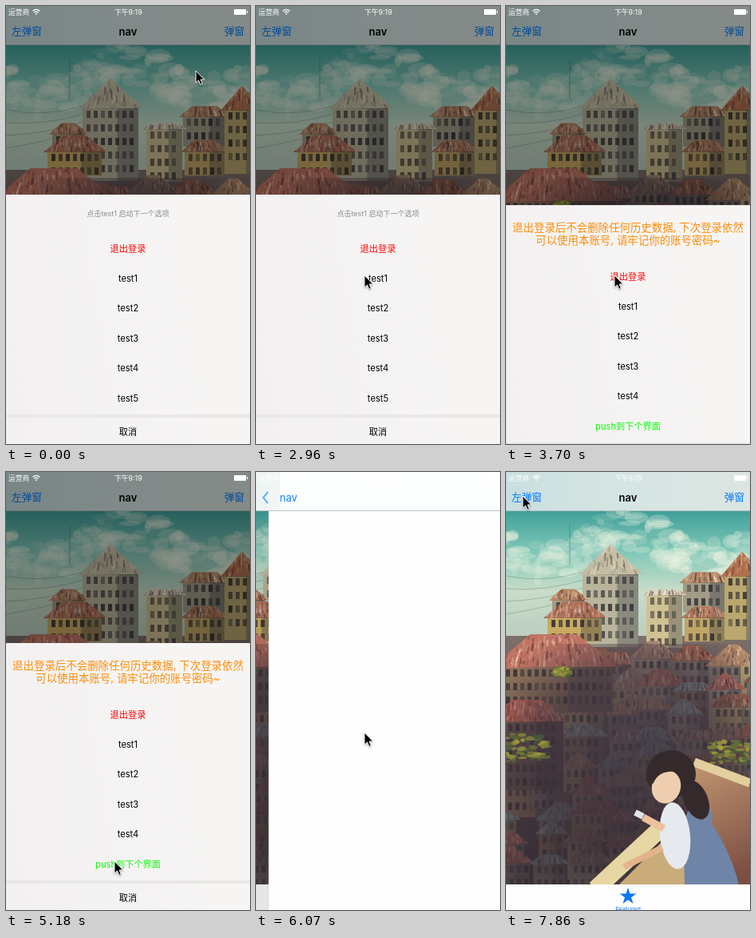
Write an HTML page with a canvas that moves like this. It is 306x548 px and loops after 8 s.

```html
<!DOCTYPE html>
<html lang="zh-CN">
<head>
<meta charset="utf-8">
<title>Action sheet</title>
<style>
html, body { margin: 0; width: 306px; height: 548px; overflow: hidden; background: #fff; }
#stage { position: relative; width: 306px; height: 548px; overflow: hidden;
  font-family: Inter, "Noto Sans CJK SC", "Noto Sans CJK", sans-serif; font-size: 11.2px; color: #000; }
#stage div, #stage svg, canvas { position: absolute; }
.full { left: 0; top: 0; width: 306px; height: 548px; }
.line { left: 0; width: 306px; height: 38px; line-height: 38px; text-align: center; white-space: nowrap; }
canvas { left: 0; top: 48px; }
#tab { left: 0; top: 516px; width: 306px; height: 32px; background: #fdfdfd; }
#shade, #dim { background: #000; }
#page { background: #fefefe; box-shadow: -1px 0 3px rgba(0,0,0,.08); }
#nav { left: 0; top: 0; width: 306px; height: 48px; background: #fdfefe; border-bottom: 1px solid #bcc2c2; overflow: hidden; }
#tint { left: 0; top: 0; height: 48px; background: linear-gradient(90deg, #c9dfdf, #d5e5e3 45%, #dce5e1); }
.btn { top: 13px; line-height: 38px; font-size: 12.7px; color: #007aff; white-space: nowrap; }
.nav { top: 13px; width: 60px; text-align: center; line-height: 38px; font-size: 13px; }
.sheet { left: 0; width: 306px; overflow: hidden; background: linear-gradient(80deg, #f2f0f0, #f6f5f4 70%); }
.gap { left: 0; width: 306px; height: 4px; background: #e9e8e7; }
.red { color: #f00; }
.green { color: #0f0; }
.hint { font-size: 9px; color: #8c8c8c; }
.warn { font-size: 13.45px; color: #ff8c0a; }
.status { top: 1px; line-height: 14px; font-size: 8.8px; color: #fff; white-space: nowrap; }
</style>
</head>
<body>
<div id="stage">
  <div id="home" class="full">
    <canvas id="art" width="306" height="468"></canvas>
    <div id="tab">
      <svg width="306" height="32"><path id="star" fill="#0a78f5"/></svg>
      <div class="line" style="top:13px;font-size:7.6px;color:#0a78f5">Featured</div>
    </div>
    <div id="shade" class="full"></div>
  </div>
  <div id="page" class="full"></div>
  <div id="nav">
    <div id="tint"></div>
    <svg id="chevron" width="20" height="48"><path d="M15 25 9 32l6 7" fill="none" stroke="#007aff" stroke-width="2"/></svg>
    <div class="btn side" style="left:7px">左弹窗</div>
    <div class="btn side" style="right:7px">弹窗</div>
    <div id="back" class="nav" style="color:#007aff">nav</div>
    <div id="title" class="nav" style="font-weight:600">nav</div>
  </div>
  <div id="dim" class="full"></div>
  <div id="sheetA" class="sheet"></div>
  <div id="sheetB" class="sheet"></div>
  <div class="status" style="left:3px">运营商</div>
  <div class="status" style="left:136px">下午9:19</div>
  <svg width="306" height="16" fill="none" stroke="#fff">
    <path d="M33.5 6.2q4.5-3.8 9 0M35.2 8.2q2.8-2.3 5.6 0" stroke-width="1.2"/>
    <circle cx="38" cy="10" r="1" fill="#fff" stroke="none"/>
    <path d="M286.5 4.5h14v6h-14zM302.5 6v3" fill="#fff"/>
  </svg>
  <svg id="cursor" width="16" height="22" style="left:-1px;top:-1px;filter:drop-shadow(0 1px 1px rgba(0,0,0,.35))">
    <path d="M1 1v15.2l3.5-3.2 2.3 5.4 2.6-1.1-2.3-5.3h4.7z" fill="#000" stroke="#fff"/>
  </svg>
</div>
<script>
const $ = id => document.getElementById(id);
let seed = 7;
const rnd = () => (seed = seed * 16807 % 2147483647) / 2147483647;
const pick = list => list[Math.floor(rnd() * list.length)];

// ---- Townscape ----
const g = $('art').getContext('2d');
g.translate(0, -48);

function gradient(x, y, x2, y2, ...colors) {
  const grad = g.createLinearGradient(x, y, x2, y2);
  colors.forEach((c, i) => grad.addColorStop(i / (colors.length - 1), c));
  return grad;
}
function fill(color, path) {
  const shape = new Path2D(path);
  g.fillStyle = color;
  g.fill(shape);
  return shape;
}
function blob(color, x, y, rx, ry, turn = 0) {
  g.fillStyle = color;
  g.beginPath();
  g.ellipse(x, y, rx, ry, turn, 0, 7);
  g.fill();
}
function stroke(color, width, path) {
  g.strokeStyle = color;
  g.lineWidth = width;
  g.stroke(new Path2D(path));
}

// x, y: upper left of the wall; rise: roof height relative to width
function house(x, y, w, h, wall, top, rise = .24) {
  fill(wall, `M${x} ${y}h${w}v${h}h${-w}z`);
  fill('rgba(40,48,62,.32)', `M${x + w * .62} ${y}h${w * .38}v${h}h${-w * .38}z`);
  for (let wy = y + 7; wy < y + h - 9; wy += 17)
    for (let wx = x + 5; wx < x + w - 6; wx += 9) {
      g.fillStyle = `rgba(45,42,48,${.45 + rnd() * .4})`;
      g.fillRect(wx, wy, 5, 9);
    }
  fill('rgba(35,28,35,.4)', `M${x} ${y}h${w}v5h${-w}z`);

  const ridge = w * Math.max(0, .45 - rise), mid = x + w / 2, up = y - w * rise;
  g.save();
  g.clip(fill(top, `M${x - 5} ${y + 5}L${mid - ridge} ${up}L${mid + ridge} ${up}L${x + w + 6} ${y + 4}z`));
  for (let i = 0; i < w * 1.6; i++) {
    const sx = x - 5 + rnd() * (w + 10), sy = up + rnd() * (y - up), len = 3 + rnd() * 9;
    const tone = rnd() < .55 ? '255,235,210' : '50,28,35';
    stroke(`rgba(${tone},${rnd() * .45})`, 1 + rnd() * 1.5, `M${sx} ${sy}l${(sx - mid) / w * len} ${len}`);
  }
  g.restore();
}
function foliage(x, y, spread) {
  for (let i = 0; i < 90; i++) {
    const t = rnd();
    blob(`rgba(${60 + t * 120 | 0},${80 + t * 90 | 0},60,.75)`,
      x + (rnd() - .5) * spread * 2, y + (rnd() - .5) * spread, 2 + rnd() * 4, 1 + rnd() * 2);
  }
}
function drawSky() {
  g.fillStyle = gradient(0, 48, 0, 200, '#3f9f99', '#7fc7b8', '#c9ddc9', '#bccfc0');
  g.fillRect(0, 48, 306, 200);
  for (let i = 0; i < 170; i++) {
    const x = rnd() * 306, band = 88 + 22 * Math.sin(x / 32);
    blob(`rgba(232,240,222,${.08 + rnd() * .3})`, x, band + (rnd() - .4) * 50, 4 + rnd() * 13, 3 + rnd() * 6);
  }
  for (let i = 0; i < 4; i++) stroke('rgba(70,95,95,.45)', .7, `M0 ${130 + i * 16}Q50 ${140 + i * 10} 100 ${124 + i * 10}`);
  stroke('rgba(70,95,95,.6)', .8, 'M80 66v50');
}
function drawTown() {
  const walls = ['#b7a272', '#a59d88', '#857b72', '#96795c'];
  const roofs = ['#bd6d5b', '#a8694e', '#7fa3a2', '#a58672', '#b58a68'];
  g.fillStyle = gradient(0, 190, 0, 516, '#81736c', '#554950', '#443a42');
  g.fillRect(0, 205, 306, 311);

  house(96, 124, 70, 95, '#b9b49b', '#c3bea4', .48);
  house(58, 156, 40, 50, '#a59a80', '#b5805e');
  house(52, 178, 68, 34, '#c9aa62', '#b0715a');
  house(222, 134, 54, 42, '#a29b85', '#b88a66', .16);
  house(224, 178, 50, 34, '#c0a565', '#b0795a', .2);
  house(274, 126, 44, 84, '#b9a76e', '#b0714f', .6);
  house(176, 150, 45, 70, '#cfc193', '#dcd8c2', .08);

  for (let y = 224; y < 490; y += 32)
    for (let x = -20; x < 306; x += 44)
      house(x + rnd() * 20, y + rnd() * 18, 30 + rnd() * 34, 34 + rnd() * 20, pick(walls), pick(roofs), .15 + rnd() * .25);
  house(-14, 240, 148, 60, '#8d735b', '#c17463', .25);
  house(-20, 308, 92, 90, '#6a5651', '#bd6355', .25);

  // The alley and the lower storeys lie in shadow
  const shadow = g.createRadialGradient(165, 360, 30, 165, 360, 190);
  shadow.addColorStop(0, 'rgba(66,56,68,.82)');
  shadow.addColorStop(.55, 'rgba(66,52,62,.65)');
  shadow.addColorStop(1, 'rgba(66,52,62,0)');
  g.fillStyle = shadow;
  g.fillRect(0, 215, 306, 301);
  g.fillStyle = gradient(0, 250, 0, 480, 'rgba(52,42,50,0)', 'rgba(52,42,50,.7)');
  g.fillRect(0, 250, 306, 266);
  foliage(18, 345, 34);
  foliage(285, 350, 28);
  foliage(70, 250, 9);
}
function drawBalcony() {
  fill(gradient(240, 370, 306, 500, '#bd926f', '#7c4e42'), 'M236 362L306 392V516H225z');
  stroke('#e3cf9d', 11, 'M236 363L306 389');
  fill('#c9ac79', 'M142 516L206 452L228 480V516z');
  stroke('#e8d6a4', 22, 'M112 522L194 446');

  // Girl, as plain shapes
  fill('#6f85a8', 'M222 440Q236 402 242 400Q262 420 258 440Q282 476 292 516H224z');
  blob('#e6e9ee', 212, 455, 19, 42, -.1);
  stroke('#ecc19c', 9, 'M198 446L172 432');
  stroke('#e2b48c', 8, 'M196 470L148 494');
  stroke('#dfe6ea', 8, 'M162 426L172 431');
  blob('#352a2b', 238, 410, 15, 26, -.4);
  blob('#352a2b', 207, 378, 31, 30);
  blob('#efceb0', 201, 394, 18, 21, .3);
  stroke('#352a2b', 10, 'M180 388Q188 368 212 370');
}
drawSky();
drawTown();
drawBalcony();

$('star').setAttribute('d', 'M' + Array.from({ length: 10 }, (_, i) => {
  const r = i % 2 ? 4.2 : 11, a = i * Math.PI / 5;
  return `${153 + r * Math.sin(a)} ${15 - r * Math.cos(a)}`;
}).join('L') + 'Z');

// ---- Sheets: rows are [text, centre y, class] ----
function fillSheet(id, top, rows) {
  const el = $(id);
  el.style.top = top + 'px';
  el.style.height = 548 - top + 'px';
  el.innerHTML = `<div class="gap" style="top:${511 - top}px"></div>` + rows.map(([text, y, cls = '']) =>
    `<div class="line ${cls}" style="top:${y - top - 19}px">${text}</div>`).join('');
}
const tests = n => Array.from({ length: n }, (_, i) => ['test' + (i + 1), 340.5 + 37.5 * i]);
const common = [['退出登录', 304, 'red'], ['取消', 533]];
fillSheet('sheetA', 236, [['点击test1 启动下一个选项', 260, 'hint'], ...common, ...tests(5)]);
fillSheet('sheetB', 214, [
  ['退出登录后不会删除任何历史数据, 下次登录依然', 242, 'warn'],
  ['可以使用本账号, 请牢记你的账号密码~', 258, 'warn'],
  ...common, ...tests(4), ['push到下个界面', 490.5, 'green']]);

// ---- Timeline, in ticks ----
const LOOP = 8000, TICKS = 54;
const phase = (k, from, to) => Math.max(0, Math.min(1, (k - from) / (to - from)));
const settle = (k, from, to, power) => 1 - (1 - phase(k, from, to)) ** power;

// Each leg goes to (x, y), bending aside by (bowX, bowY) on the way
const legs = [
  { from: 0, to: 6, x: 137, y: 318, bowX: -45, bowY: 20 },
  { from: 9, to: 13, x: 136, y: 337, bowX: 12, bowY: -25 },
  { from: 14, to: 20, x: 136, y: 337, bowX: -5, bowY: -49 },
  { from: 25, to: 32, x: 140, y: 455 },
  { from: 32, to: 35, x: 136, y: 487, bowX: 10, bowY: 10 },
  { from: 39, to: 41, x: 136, y: 326 },
  { from: 41, to: 46, x: 12, y: 22 },
  { from: 50, to: 53, x: 21, y: 30 }];

function pointer(k) {
  let x = 238, y = 81;
  for (const leg of legs) {
    const u = phase(k, leg.from, leg.to), ease = u * u * (3 - 2 * u), bow = Math.sin(Math.PI * u);
    x += (leg.x - x) * ease + (leg.bowX || 0) * bow;
    y += (leg.y - y) * ease + (leg.bowY || 0) * bow;
  }
  return [x, y];
}
const move = (el, x, y) => { el.style.transform = `translate(${x}px,${y}px)`; };
const fade = (el, o) => { el.style.opacity = Math.max(0, Math.min(1, o)); };

function draw(ms) {
  const k = Math.min(TICKS - 1, Math.floor((ms % LOOP + 9) * TICKS / LOOP));
  move($('cursor'), ...pointer(k));

  const shownA = 1 - phase(k, 21, 23);
  const shownB = settle(k, 24, 26, 3.25) - phase(k, 36, 38);
  move($('sheetA'), 0, 312 * (1 - shownA));
  move($('sheetB'), 0, 334 * (1 - shownB));
  fade($('dim'), .4 * Math.min(1, 1.15 * Math.max(shownA, shownB)));

  // q: how much of the home screen is uncovered
  const q = 1 - settle(k, 39, 42, 2.7) + settle(k, 47, 50, 2.45), x = 306 * q;
  move($('home'), -.3 * (306 - x), 0);
  move($('page'), x, 0);
  $('page').style.visibility = q < 1 ? 'visible' : 'hidden';
  fade($('shade'), .1 * (1 - q * 1.6));

  const titleX = 8 + 115 * q ** 1.25, late = (q - .63) / .37;
  $('tint').style.width = (q ? x + 14 : 0) + 'px';
  fade($('tint'), q < 1 ? .3 + q * .5 : 1);
  move($('back'), titleX, 0);
  move($('title'), titleX, 0);
  fade($('back'), 1 - q);
  fade($('title'), late);
  fade($('chevron'), 1 - q * 8);
  document.querySelectorAll('.side').forEach(el => fade(el, late));
}
const start = performance.now();
function loop() {
  draw(performance.now() - start);
  requestAnimationFrame(loop);
}
loop();
</script>
</body>
</html>
```
